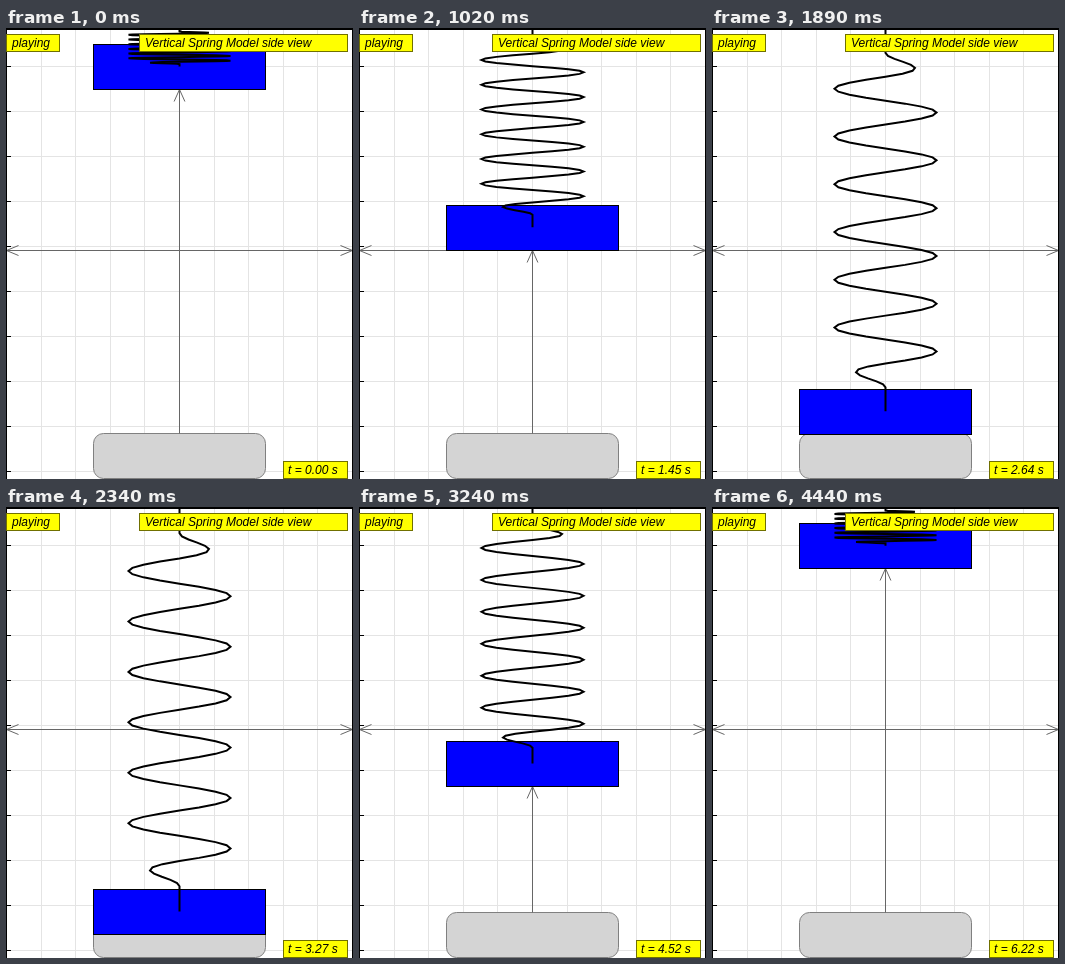
Write an HTML page that moves like this. It is 347 by 451 pixels and loops after 4.5 s.

```html
<!DOCTYPE html>
<html lang="en">
<head>
<meta charset="utf-8">
<title>Vertical spring</title>
<style>
  html, body { margin: 0; width: 100%; height: 100%; overflow: hidden; background: #fff; }
  svg { display: block; width: 347px; height: 451px; }
  text { font: italic 12px "Liberation Sans", Arial, sans-serif; fill: #000; white-space: pre; }
  .label { fill: #ff0; stroke: #707000; }
  .thin { fill: none; stroke: #666; }
  .coil { fill: none; stroke: #000; stroke-width: 2; stroke-miterlimit: 4.5; }
</style>
</head>
<body>
<svg viewBox="0 0 347 451">
  <path id="grid" fill="none" stroke="#e4e4e4"/>
  <path id="ticks" fill="none" stroke="#000"/>
  <path class="thin" d="M0.5 222.5H346.5M12.5 217.5L0.5 222.5L12.5 227.5M334.5 217.5L346.5 222.5L334.5 227.5"/>
  <rect x="87.5" y="405.5" width="172" height="45" rx="10" fill="#d4d4d4" stroke="#808080"/>
  <path id="range" class="thin"/>
  <rect id="mass" x="87.5" width="172" height="45" fill="#00f" stroke="#000"/>
  <polyline id="spring" class="coil"/>
  <path d="M0.5 451V0M346.5 0V451" stroke="#000"/>
  <path d="M0 1H347" stroke="#000" stroke-width="2"/>
  <rect class="label" x="0.5" y="6.5" width="53" height="17"/>
  <text x="6" y="19">playing</text>
  <rect class="label" x="133.5" y="6.5" width="208" height="17"/>
  <text x="139" y="19">Vertical Spring Model side view</text>
  <rect class="label" x="277.5" y="433.5" width="64" height="17"/>
  <text id="clock" x="282" y="446"></text>
</svg>
<script>
const $ = id => document.getElementById(id);
const LOOP = 4500, STEPS = 100, TICK = 30;
const MID = 173.5, REST = 222.2, SWING = 183.7, PAD = 405.5;
const COILS = 8, PER_COIL = 16, RADIUS = 51, TOP = 1;

function drawGrid() {
  let grid = "", ticks = "";
  for (let i = 1; i < 10; i++) grid += `M${Math.round(i * 34.6) + 0.5} 0V451`;
  for (let y = 38.5; y < 451; y += 45) {
    grid += `M0 ${y}H347`;
    ticks += `M0 ${y}H5`;
  }
  $("grid").setAttribute("d", grid);
  $("ticks").setAttribute("d", ticks);
}

// Sine coil, straight for half a turn at each end, then tapering to full width.
function springPoints(end) {
  const total = COILS * PER_COIL, half = PER_COIL / 2, points = [];
  for (let i = 0; i <= total; i++) {
    const inset = Math.min(i, total - i) - half;
    const width = Math.max(0, Math.min(1, inset / half));
    const x = MID - RADIUS * width * Math.sin(i * 2 * Math.PI / PER_COIL);
    const y = TOP + (end - TOP) * i / total;
    points.push(x.toFixed(2) + "," + y.toFixed(2));
  }
  return points.join(" ");
}

function rangeArrow(tip) {
  const length = PAD - tip;
  if (length <= 0) return "";
  const head = Math.min(12, length * 0.55), wing = head * 0.45;
  return `M${MID} ${PAD}V${tip}M${MID - wing} ${tip + head}L${MID} ${tip}L${MID + wing} ${tip + head}`;
}

// Steps last 45 ms on average, aligned to 30 ms ticks.
function stepAt(ms) {
  const lead = ms < 570 || ms >= 3510 ? 30 : 15;
  const tick = Math.floor(ms / TICK) * TICK;
  return Math.min(STEPS - 1, Math.floor((tick + lead) / 45));
}

function draw(step) {
  const t = step * 2 * Math.PI / STEPS;
  const y = REST - SWING * Math.cos(t);
  const top = Math.round(y - 22.5) + 0.5;
  $("mass").setAttribute("y", top);
  $("range").setAttribute("d", rangeArrow(top + 45));
  $("spring").setAttribute("points", springPoints(y));
  $("clock").textContent = `t = ${t.toFixed(2)} s`;
}

let shown = -1;
const start = performance.now();
function frame() {
  const step = stepAt((performance.now() - start) % LOOP);
  if (step !== shown) draw(shown = step);
  requestAnimationFrame(frame);
}

drawGrid();
frame();
</script>
</body>
</html>
```
